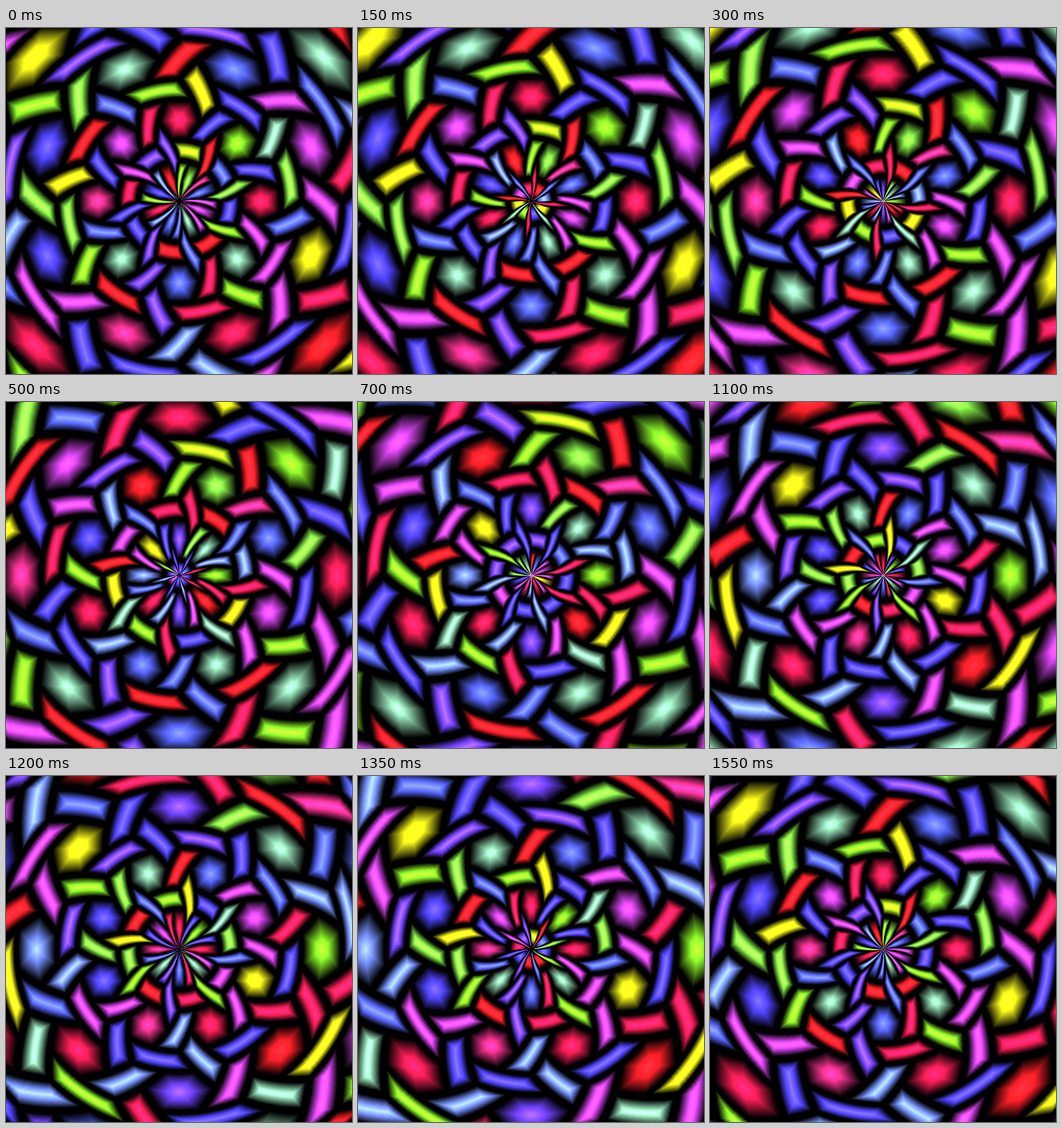
An HTML page with a canvas that plays this animation: 512x512 px, repeating every 1.6 s.

```html
<!DOCTYPE html>
<html lang="en">
<head>
<meta charset="utf-8">
<title>Woven tunnel</title>
<style>
  html, body { margin: 0; width: 100%; height: 100%; overflow: hidden; background: #000; }
  canvas { display: block; width: 512px; height: 512px; }
</style>
</head>
<body>
<canvas id="stage" width="512" height="512"></canvas>
<script>
const SIZE = 512, STEPS = 32, STEP_MS = 50;
const TW = 1536, TH = 512;            // texture: angle x radius
const COLS = 8, ROWS = 4;
const S3 = Math.sqrt(3), ROW_H = S3 / 2;
const HALF = S3 / 12, HOLE = S3 / 6;  // half band width, hexagon inradius
const MARGIN = 0.029;                 // black seam
const GLOW = 2.1;                     // overexposure at the middle of a piece

const palette = {
  Y: [190, 190, 20], E: [145, 186, 24], G: [104, 182, 30], L: [100, 176, 52],
  M: [102, 152, 125], S: [92, 114, 200], A: [70, 82, 205], B: [66, 56, 212],
  V: [92, 54, 210], P: [158, 50, 175], K: [178, 36, 105], C: [190, 23, 66],
  R: [205, 25, 32]
};

// Per row: hexagons, then bands rising clockwise, level, rising anticlockwise.
const weave = [
  ["CGCMAMKP", "BBPCVABC", "GBLPCRLR", "YMAGVGYA"],
  ["APYCKBBM", "PPPSPLLR", "VABBBPVV", "BCCSBSGB"],
  ["VMGRVCSY", "LSCPSAPB", "CRSYBGYP", "CACMCMRA"],
  ["LAPMACBR", "KPPASGSG", "EABRRBCV", "RLGAVBPV"]
];

const mod = (n, m) => ((n % m) + m) % m;

function hexDepth(x, y) {
  const a = y / 2, b = x * ROW_H;
  return HOLE - Math.max(Math.abs(y), Math.abs(a + b), Math.abs(a - b));
}

// Band piece through (0,0); its ends follow the bands that cross over it.
function bandDepth(x, y, cos, sin) {
  const p = x * cos + y * sin, q = y * cos - x * sin;
  return Math.min(HALF - Math.abs(q), HOLE - Math.abs(p * ROW_H + q / 2));
}

function shade(kind, row, col, depth) {
  const c = palette[weave[mod(row, ROWS)][kind][mod(col, COLS)]];
  const top = kind ? HALF : HOLE;
  const s = GLOW * Math.max(0, (depth - MARGIN) / (top - MARGIN));
  const ch = i => Math.min(255, Math.round(c[i] * s));
  return (255 << 24 | ch(2) << 16 | ch(1) << 8 | ch(0)) >>> 0;
}

function texel(u, v) {
  const base = Math.floor(v);
  let best = -1, kind = 0, row = 0, col = 0;
  const keep = (d, k, r, c) => {
    if (d > best) { best = d; kind = k; row = r; col = c; }
  };
  for (let r = base; r <= base + 1; r++) {
    const shift = (r & 1) / 2, y = (v - r) * ROW_H, yb = y - ROW_H / 2;
    const first = Math.floor(u - shift);
    for (let c = first; c <= first + 1; c++) {
      const x = u - shift - c;
      keep(hexDepth(x, y), 0, r, c);
      keep(bandDepth(x - 0.5, y, 0.5, ROW_H), 1, r, c);
      keep(bandDepth(x + 0.25, yb, 1, 0), 2, r, c);
      keep(bandDepth(x - 0.25, yb, -0.5, ROW_H), 3, r, c);
    }
  }
  return shade(kind, row, col, best);
}

const texture = new Uint32Array(TW * TH);
for (let j = 0; j < TH; j++)
  for (let i = 0; i < TW; i++)
    texture[j * TW + i] = texel(i / TW * COLS, j / TH * ROWS - 4 / 3);

// Texture position of every stage pixel, in polar coordinates.
const angleAt = new Uint16Array(SIZE * SIZE), radiusAt = new Uint16Array(SIZE * SIZE);
const mid = SIZE / 2, reach = mid * Math.SQRT2;
for (let y = 0, n = 0; y < SIZE; y++)
  for (let x = 0; x < SIZE; x++, n++) {
    const dx = x - mid, dy = y - mid;
    const turn = Math.atan2(dx, -dy) / (2 * Math.PI);
    angleAt[n] = mod(Math.round(turn * TW), TW);
    radiusAt[n] = Math.round(Math.hypot(dx, dy) / reach * TH);
  }

const ctx = document.getElementById("stage").getContext("2d");
const image = ctx.createImageData(SIZE, SIZE);
const pixels = new Uint32Array(image.data.buffer);
let shown = -1;

function draw(ms) {
  const step = Math.floor(ms / STEP_MS) % STEPS;
  if (step === shown) return;
  shown = step;
  const back = TH - step * TH / STEPS;
  for (let n = 0; n < pixels.length; n++)
    pixels[n] = texture[(radiusAt[n] + back) % TH * TW + angleAt[n]];
  ctx.putImageData(image, 0, 0);
}

function tick(now) {
  draw(Math.max(0, now));
  requestAnimationFrame(tick);
}
draw(0);
requestAnimationFrame(tick);
</script>
</body>
</html>
```
